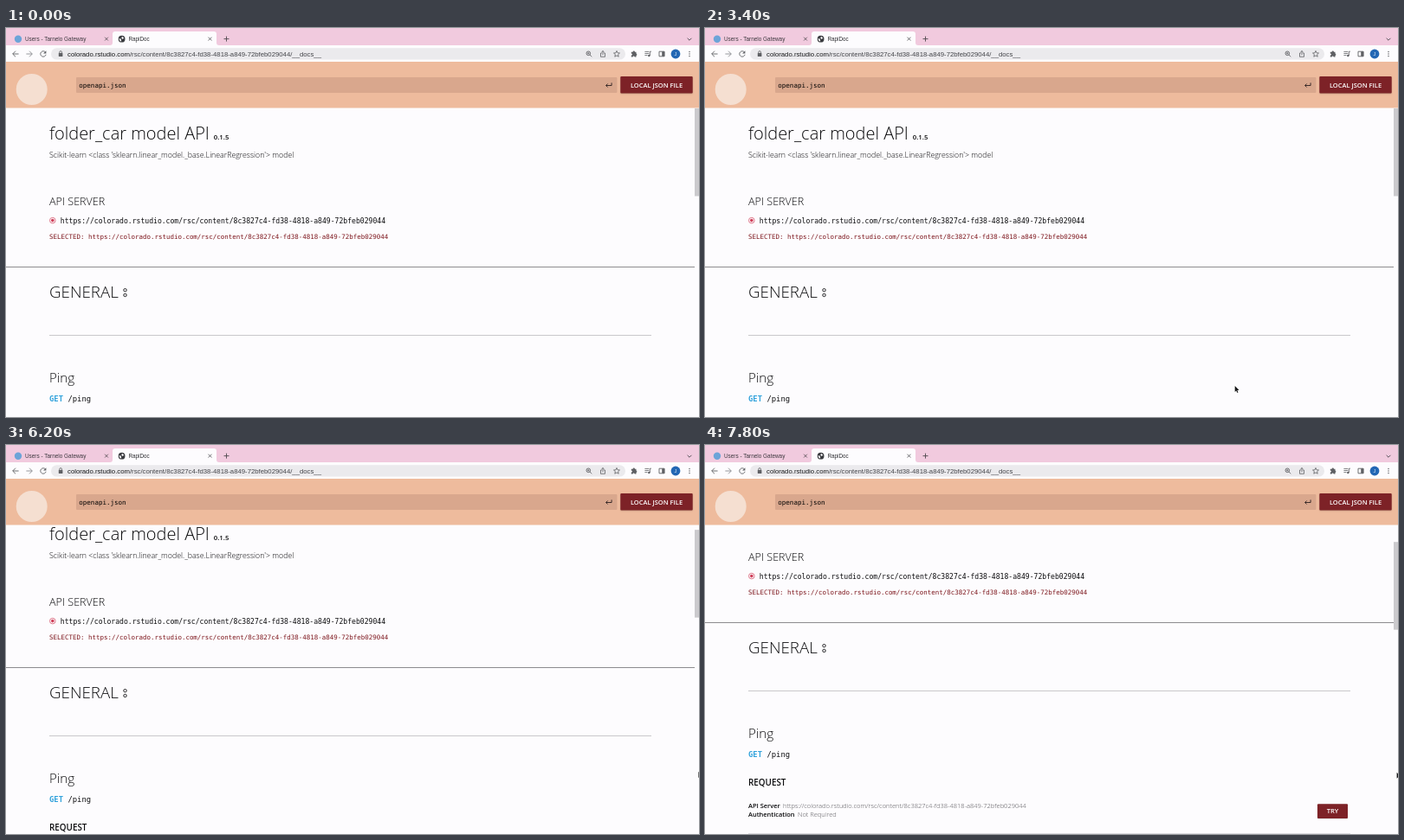
An HTML page with a canvas that plays this animation: 800x450 px, repeating every 8 s.

```html
<!DOCTYPE html>
<html lang="en">
<head>
<meta charset="utf-8">
<title>API docs scroll</title>
<style>
html, body { margin: 0; width: 100%; height: 100%; overflow: hidden; background: #fdfcfe; }
canvas { display: block; width: 800px; height: 450px; }
</style>
</head>
<body>
<canvas id="stage"></canvas>
<script>
const canvas = document.getElementById('stage');
const ctx = canvas.getContext('2d');
const ratio = window.devicePixelRatio || 1;
canvas.width = 800 * ratio;
canvas.height = 450 * ratio;

const LOOP = 8000, STEP = 200;
const SANS = '"Open Sans", sans-serif';
const MONO = '"DejaVu Sans Mono", monospace';
const UI = '"Liberation Sans", Arial, sans-serif';
const INK = '#0c0c0e', ICON = '#5f6064', MAROON = '#7d2227', PAPER = '#fdfcfe';
const PATH = '/rsc/content/8c3827c4-fd38-4818-a849-72bfeb029044';
const HOST = 'colorado.rstudio.com';
const SERVER = 'https://' + HOST + PATH;

// Scroll offset per step, from SCROLL_START on
const SCROLL_START = 5600;
const SCROLL = [0, 3, 7, 19, 33, 44, 52, 58, 63, 66, 69, 71];

function text(str, x, y, size, color, family = SANS, weight = 400, align = 'left') {
  ctx.font = `${weight} ${size}px ${family}`;
  ctx.fillStyle = color;
  ctx.textAlign = align;
  ctx.fillText(str, x, y);
}

function rect(x, y, w, h, color, r = 0) {
  ctx.fillStyle = color;
  ctx.beginPath();
  ctx.roundRect(x, y, w, h, r);
  ctx.fill();
}

function disc(x, y, r, color) {
  ctx.fillStyle = color;
  ctx.beginPath();
  ctx.arc(x, y, r, 0, Math.PI * 2);
  ctx.fill();
}

function ring(x, y, r, color, width = 1) {
  ctx.strokeStyle = color;
  ctx.lineWidth = width;
  ctx.beginPath();
  ctx.arc(x, y, r, 0, Math.PI * 2);
  ctx.stroke();
}

// Path data drawn relative to (x, y)
function stroke(d, x, y, color = ICON, width = 0.9) {
  ctx.save();
  ctx.translate(x, y);
  ctx.strokeStyle = color;
  ctx.lineWidth = width;
  ctx.stroke(new Path2D(d));
  ctx.restore();
}

function fill(d, x, y, color = ICON) {
  ctx.save();
  ctx.translate(x, y);
  ctx.fillStyle = color;
  ctx.fill(new Path2D(d));
  ctx.restore();
}

function button(label, x, y, w, h, size) {
  ctx.save();
  ctx.shadowColor = 'rgba(0,0,0,0.2)';
  ctx.shadowBlur = 1.5 * ratio;
  ctx.shadowOffsetY = 0.6 * ratio;
  rect(x, y, w, h, MAROON, 1);
  ctx.restore();
  text(label, x + w / 2, y + h / 2 + 2.7, size, '#fff', SANS, 600, 'center');
}

function drawTabs() {
  rect(0, 0, 800, 21, '#f1cade');
  fill('M0 16 Q3 16 3 13 V3 Q3 0 6 0 H120 Q123 0 123 3 V13 Q123 16 126 16 Z', 120, 4, PAPER);
  disc(14, 12.7, 4.2, '#6ca4d8');
  text('Users - Tarnelo Gateway', 22, 15, 6.4, '#3f3a40', UI);
  text('RapiDoc', 141.5, 15, 6.3, '#2d2d30', UI);

  disc(133.6, 12.7, 3.9, '#3a3b3f');
  fill('M-2.9 -.8 L-.8 .1 L-.4 1.5 L-1.2 3 Q-3.1 1.8 -2.9 -.8 Z M.4 -3 L2.6 -1.2 L1 .2 L-.3 -1 Z', 133.6, 12.7, PAPER);
  const cross = 'M-1.9 -1.9 L1.9 1.9 M1.9 -1.9 L-1.9 1.9';
  stroke(cross, 116, 12.6, '#4f484d', 0.8);
  stroke(cross, 235.5, 12.6, '#4a4a4e', 0.8);
  stroke('M-3 0 H3 M0 -3 V3', 254.5, 12.6, '#4f484d');
  stroke('M-2.4 -1.2 L0 1.2 L2.4 -1.2', 789, 13, '#4f484d');
}

function drawToolbar() {
  rect(0, 20, 800, 19, PAPER);
  rect(52, 23.2, 663, 13.4, '#ebeaed', 6.7);
  stroke('M3.6 0 H-3.2 M0 -3.3 L-3.3 0 L0 3.3', 11, 30);
  stroke('M-3.6 0 H3.2 M0 -3.3 L3.3 0 L0 3.3', 27, 30, '#8b8c90');
  stroke('M2.6 -1.9 A3.2 3.2 0 1 0 3.1 .8', 43, 30);
  fill('M3.4 -3.7 V-.4 H.1 Z', 43, 30);

  rect(60.8, 28.9, 4.6, 4.1, ICON, 0.6);
  stroke('M-1.3 -.8 V-2 A1.3 1.3 0 0 1 1.3 -2 V-.8', 63.1, 29.9, ICON, 0.8);
  text(HOST, 71, 32.7, 7.75, '#161719', UI);
  const hostWidth = ctx.measureText(HOST).width;
  text(PATH + '/__docs__', 71 + hostWidth, 32.7, 7.75, '#434449', UI);

  ring(672.3, 29.3, 2.3, ICON, 0.9);
  stroke('M1 1 L3.3 3.3 M-1.9 -.7 H.5 M-.7 -1.9 V.5', 673, 30, ICON, 0.8);
  stroke('M-1.2 -1 H-2.5 V3.3 H2.5 V-1 H1.2 M0 1.3 V-3.4 M-1.6 -2 L0 -3.5 L1.6 -2', 689, 30, ICON, 0.8);
  stroke('M0 -3.6 L1 -1.2 L3.5 -1 L1.6 .7 L2.2 3.2 L0 1.9 L-2.2 3.2 L-1.6 .7 L-3.5 -1 L-1 -1.2 Z', 705, 30, ICON, 0.8);
  fill('M-3.2 -2 H-1.4 A1.2 1.2 0 0 1 1 -2 H2.5 V-.2 A1.2 1.2 0 0 1 2.5 2.1 V3.6 H.8 A1.2 1.2 0 0 0 -1.5 3.6 H-3.2 V1.9 A1.1 1.1 0 0 0 -3.2 -.4 Z', 725, 29.8);
  stroke('M-3.6 -2.6 H1.4 M-3.6 -.5 H1.4 M-3.6 1.6 H-.5 M2.4 2 V-2.8 H4', 741, 30, ICON, 0.8);
  disc(742.3, 32, 1.2, ICON);
  stroke('M-3 -2.8 H3 V2.8 H-3 Z', 757, 30, ICON, 0.9);
  rect(757.2, 27.2, 3, 5.6, ICON);
  disc(773, 30, 5.4, '#2367b4');
  text('J', 773, 32.1, 5.6, '#e5effa', UI, 400, 'center');
  for (const y of [27.4, 30, 32.6]) disc(789, y, 0.75, ICON);
}

function drawHeader() {
  rect(0, 39, 800, 53.5, '#eebb9d');
  disc(29.7, 71, 18, '#f5dfd1');
  rect(81, 57, 624.5, 18, '#d9a78d', 1);
  text('openapi.json', 84.3, 68.6, 7.53, '#000', MONO);
  stroke('M3.3 -2.3 V.8 H-3 M-1.2 -1.2 L-3.2 .8 L-1.2 2.8', 695.8, 65.7, '#2b2020', 0.9);
  button('LOCAL JSON FILE', 709.3, 56, 83.4, 19.6, 7.5);
}

function drawPage(scroll) {
  ctx.save();
  ctx.beginPath();
  ctx.rect(0, 92.5, 800, 357.5);
  ctx.clip();
  ctx.translate(0, -scroll);

  text('folder_car model API', 50, 129, 20, INK, SANS, 300);
  text('0.1.5', 239.8, 129, 7.78, INK, SANS, 600);
  text("Scikit-learn <class 'sklearn.linear_model._base.LinearRegression'> model", 50, 150, 8.79, INK, SANS, 300);

  text('API SERVER', 50, 205.1, 12.55, INK, SANS, 300);
  ring(53.8, 222.6, 3.3, '#dc6b80', 0.9);
  disc(53.8, 222.6, 1.8, '#cf3f59');
  text(SERVER, 62.8, 226.4, 8.11, INK, MONO);
  text('SELECTED: ' + SERVER, 50, 243.8, 7.48, '#7d161c', MONO);
  rect(0, 276, 795, 1, '#8d8c8f');

  text('GENERAL', 50, 312, 18.75, INK, SANS, 300);
  ring(137.5, 303.2, 1.7, INK, 0.9);
  ring(137.5, 309, 1.7, INK, 0.9);
  rect(50, 355, 695, 1, '#c9c8cb');

  text('Ping', 50, 410.2, 15.1, INK, SANS, 300);
  text('GET', 50, 432.2, 8.89, '#33a3dc', MONO, 700);
  text('/ping', 71.4, 432.2, 8.89, INK, MONO);

  text('REQUEST', 50, 465.2, 9.9, INK, SANS, 600);
  text('API Server', 50, 491.2, 7.45, INK, SANS, 600);
  text(SERVER, 90, 491.2, 7.5, '#545358', SANS, 300);
  text('Authentication', 50, 501.2, 7.45, INK, SANS, 600);
  text('Not Required', 107, 501.2, 7.5, '#545358', SANS, 300);
  button('TRY', 707, 486.3, 35, 16.7, 7.6);
  rect(50, 520, 695, 1, '#dddce0');
  ctx.restore();

  rect(795, 93 + scroll * 0.27, 5, 101.5, '#cbcacd');
}

function drawCursor(t) {
  if (t < 2600) return;
  const p = Math.min(1, Math.max(0, (t - 3800) / 800));
  const ease = p * p * (3 - 2 * p);
  const nudge = t >= 7600 ? 0.8 : 0;
  const x = 611.7 + 187.7 * ease - nudge;
  const y = 414 - 36 * ease + nudge;
  const arrow = 'M0 0 V7 L1.6 5.5 L2.7 8 L3.8 7.5 L2.7 5.1 H4.9 Z';
  stroke(arrow, x, y, '#fff', 1.2);
  fill(arrow, x, y, '#18181a');
}

function frame(now) {
  const t = Math.floor((now % LOOP) / STEP) * STEP;
  const step = Math.max(0, (t - SCROLL_START) / STEP);
  ctx.setTransform(ratio, 0, 0, ratio, 0, 0);
  rect(0, 0, 800, 450, PAPER);
  drawPage(SCROLL[step]);
  drawTabs();
  drawToolbar();
  drawHeader();
  drawCursor(t);
  requestAnimationFrame(frame);
}

requestAnimationFrame(frame);
</script>
</body>
</html>
```
